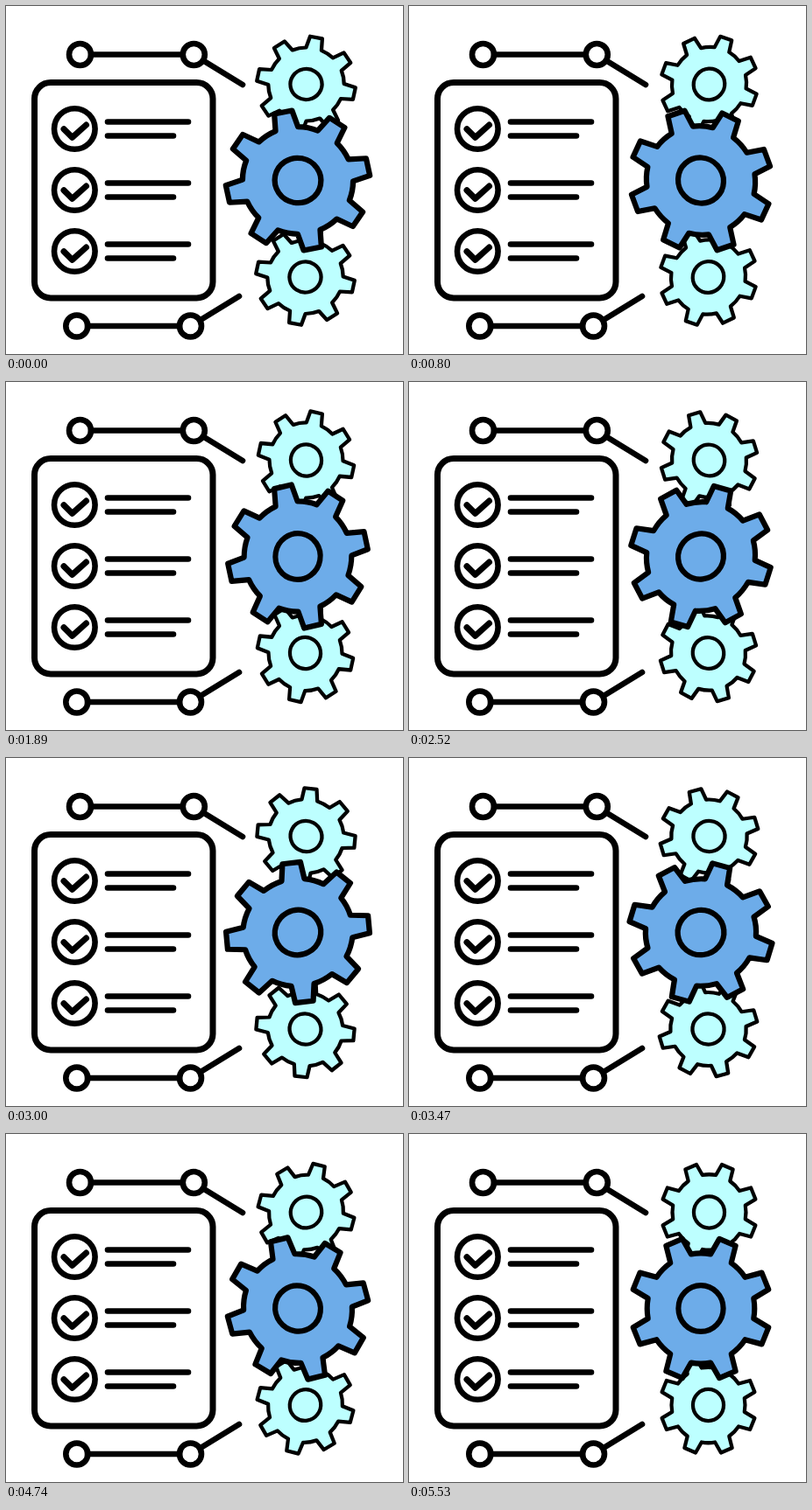
An HTML page for the animation above (5.61 s loop, 453 by 398 pixels).

```html
<!DOCTYPE html>
<html lang="en">
<head>
<meta charset="utf-8">
<title>Checklist and gears</title>
<style>
  html, body { margin: 0; width: 100%; height: 100%; overflow: hidden; background: #fff; }
  svg { display: block; width: 453px; height: 398px; }
</style>
</head>
<body>
<svg viewBox="0 0 453 398" fill="none" stroke="#000" stroke-width="6.6" stroke-linecap="round" stroke-linejoin="round">
  <defs>
    <g id="item">
      <circle cx="78.3" cy="140.5" r="23.3"/>
      <path d="M66 140.800L75.500 150.300L91.500 136" stroke-width="7"/>
      <path d="M116 132.500H208M116 148.500H191"/>
    </g>
    <g id="gear" stroke-width="6.2">
      <path id="outline"/>
      <circle r="26"/>
    </g>
  </defs>
  <rect x="32.500" y="87.500" width="203.500" height="246.500" rx="18.500" stroke-width="7"/>
  <use href="#item"/>
  <use href="#item" y="70"/>
  <use href="#item" y="140"/>
  <path d="M97 55.500H201M226 63L270 90M93 366H198M222 359L266 332"/>
  <circle cx="84.500" cy="55.500" r="12.500"/>
  <circle cx="214.300" cy="55.500" r="12.500"/>
  <circle cx="80.800" cy="366" r="12.500"/>
  <circle cx="210.500" cy="366" r="12.500"/>
  <use href="#gear" class="gear" fill="#bdffff" data-x="342.5" data-y="89.5" data-size=".685" data-dir="-1"/>
  <use href="#gear" class="gear" fill="#bdffff" data-x="341.5" data-y="310" data-size=".685" data-dir="-1"/>
  <use href="#gear" class="gear" fill="#6dace9" data-x="333" data-y="199.5" data-size="1" data-dir="1"/>
</svg>
<script>
  const LOOP = 5610, STEP = 79, LAST = 70, TURN = 3.7;
  const TEETH = 8, TIP = 81.3, ROOT = 62.2, TIP_HALF = 7.2, ROOT_HALF = 12;

  const polar = (radius, degrees) => {
    const a = degrees * Math.PI / 180;
    return `${(radius * Math.cos(a)).toFixed(2)} ${(radius * Math.sin(a)).toFixed(2)}`;
  };

  const arc = `A${ROOT} ${ROOT} 0 0 1 `;
  const teeth = Array.from({ length: TEETH }, (_, i) => {
    const mid = (i + 0.5) * 360 / TEETH;
    return [
      polar(ROOT, mid - ROOT_HALF), polar(TIP, mid - TIP_HALF),
      polar(TIP, mid + TIP_HALF), polar(ROOT, mid + ROOT_HALF)
    ].join('L');
  });
  const firstPoint = teeth[0].split('L')[0];
  document.getElementById('outline').setAttribute('d', `M${teeth.join(arc)}${arc}${firstPoint}Z`);

  const gears = document.querySelectorAll('.gear');

  // The gears are slightly taller than wide, so they wobble as they turn.
  function draw(now) {
    const step = Math.min(LAST, Math.floor((now % LOOP) / STEP + 0.1));
    const angle = (step - LAST) * TURN;
    for (const gear of gears) {
      const { x, y, size, dir } = gear.dataset;
      gear.setAttribute('transform',
        `translate(${x} ${y}) rotate(${angle * dir}) scale(${size * 0.985} ${size * 1.015})`);
    }
  }

  const start = performance.now();
  function tick() {
    draw(performance.now() - start);
    requestAnimationFrame(tick);
  }
  tick();
</script>
</body>
</html>
```
